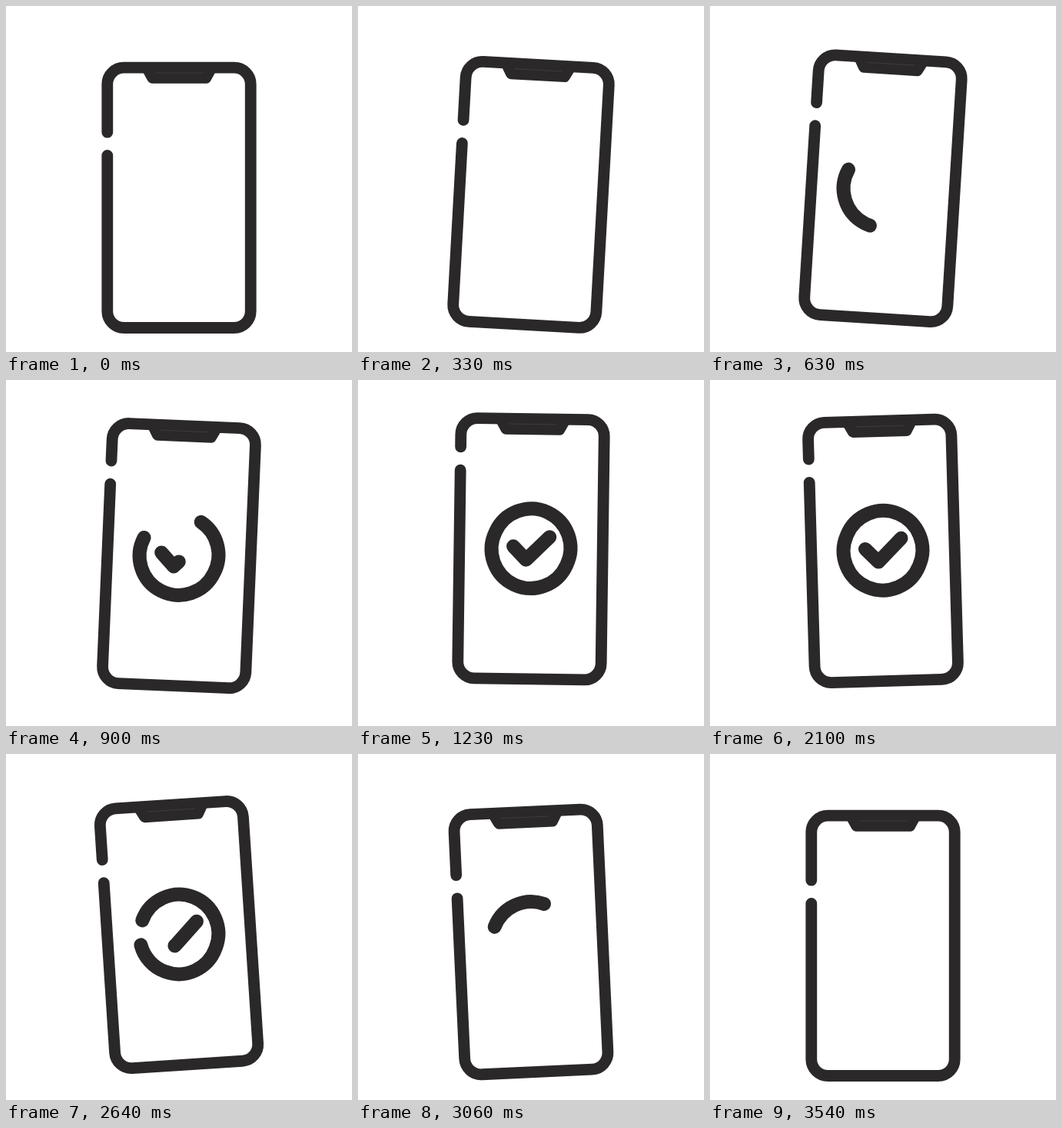
Write an HTML page that moves like this. It is 450 px wide and 450 px high and loops after 3.57 s.

```html
<!DOCTYPE html>
<html lang="en">
<head>
<meta charset="utf-8">
<title>Phone check</title>
<style>
  html, body { margin: 0; width: 100%; height: 100%; overflow: hidden; background: #fff; }
  svg { display: block; width: 100%; height: 100%; }
  .line { fill: none; stroke: #2b2829; stroke-linecap: round; stroke-linejoin: round; }
</style>
</head>
<body>
<svg viewBox="0 0 450 450">
  <g id="phone">
    <path id="frame" class="line" stroke-width="14.8"/>
    <path fill="#2b2829" d="M-47-163.5 L-41-152.5 Q-38.5-148.5 -34.5-148.5 H35.5 Q39.5-148.5 41.5-152.5 L47.5-163.5Z"/>
    <path stroke="#454142" stroke-width=".8" d="M-31-162.3H31"/>
    <g transform="translate(0 -.6)">
      <path id="ring" class="line" stroke-width="18" pathLength="1"
        d="M-46.4-21.15 A51 51 0 1 0 46.4 21.15 A51 51 0 1 0 -46.4-21.15"/>
      <path id="tick" class="line" stroke-width="18" pathLength="1" d="M-23-2.5 L-6.3 14.7 L24-15.2"/>
    </g>
  </g>
</svg>
<script>
const LOOP = 3570;
const [phone, frame, ring, tick] =
  ['phone', 'frame', 'ring', 'tick'].map(id => document.getElementById(id));

// Keys are [ms, value]
const tracks = {
  y: [[0, 249.3], [1540, 216.3], [1560, 216.3], [3540, 249.3]],
  angle: [[0, 0], [450, 3.85], [1550, 0], [2770, -3.85], [3550, 0]],
  gap: [[0, -70], [1380, -118], [1455, -118], [3520, -70]],
  ringEnd: [[335, 0], [1193, 1]],
  ringStart: [[2470, 0], [3340, 1]],
  tickEnd: [[640, 0], [1165, 1]],
  tickStart: [[2400, 0], [3000, 1]]
};

const ease = u => u * u * (3 - 2 * u);

function at(name, t) {
  const keys = tracks[name];
  if (t <= keys[0][0]) return keys[0][1];
  for (let i = 1; i < keys.length; i++) {
    const [t0, a] = keys[i - 1], [t1, b] = keys[i];
    if (t < t1) return a + (b - a) * ease((t - t0) / (t1 - t0));
  }
  return keys[keys.length - 1][1];
}

function trim(path, start, end) {
  const len = end - start;
  path.style.visibility = len > 0.0005 ? 'visible' : 'hidden';
  path.setAttribute('stroke-dasharray', `${len} 2`);
  path.setAttribute('stroke-dashoffset', -start);
}

// Rounded outline, open on the left side around height g
function outline(g) {
  const w = 93.2, h = 169.2, r = 21.5, x = w - r, y = h - r;
  const arc = (px, py) => `A${r} ${r} 0 0 1 ${px} ${py}`;
  return `M${-w} ${g - 15.1}V${-y}${arc(-x, -h)}H${x}${arc(w, -y)}` +
    `V${y}${arc(x, h)}H${-x}${arc(-w, y)}V${g + 15.1}`;
}

function draw(t) {
  phone.setAttribute('transform', `translate(225 ${at('y', t)}) rotate(${at('angle', t)})`);
  frame.setAttribute('d', outline(at('gap', t)));
  trim(ring, at('ringStart', t), at('ringEnd', t));
  trim(tick, at('tickStart', t), at('tickEnd', t));
}

const begin = performance.now();
function play() {
  draw((performance.now() - begin) % LOOP);
  requestAnimationFrame(play);
}
play();
</script>
</body>
</html>
```
